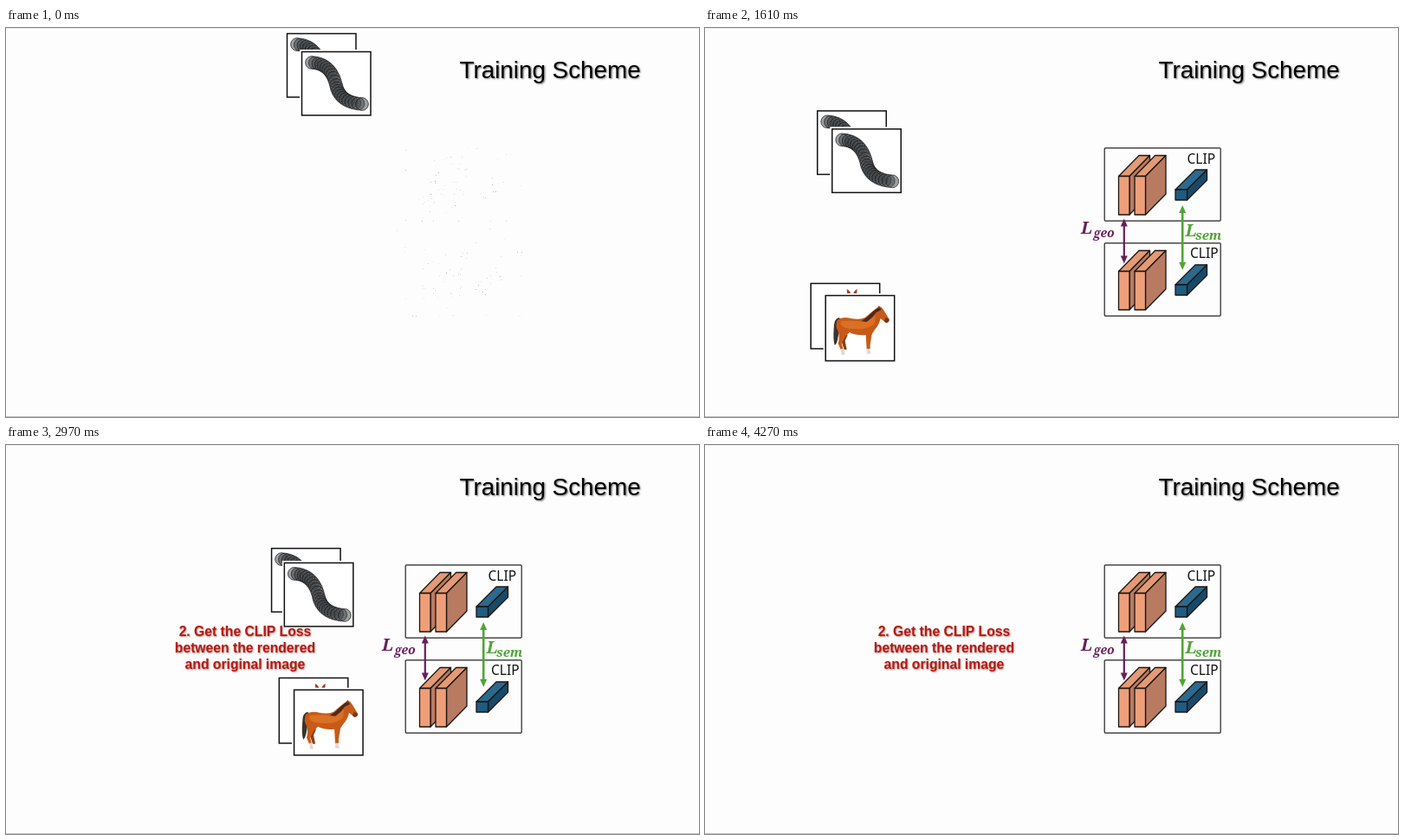
Animation, 800 px wide and 450 px high, one loop 4300 ms. Source, as an HTML page with a canvas:

```html
<!DOCTYPE html>
<html lang="en">
<head>
<meta charset="utf-8">
<title>Training Scheme</title>
<style>
html, body { margin: 0; width: 100%; height: 100%; overflow: hidden; background: #fdfdfd; }
canvas { display: block; }
</style>
</head>
<body>
<canvas id="stage" width="800" height="450"></canvas>
<script>
const W = 800, H = 450, LOOP = 4300;
const ctx = document.getElementById('stage').getContext('2d');
const clamp = v => Math.min(1, Math.max(0, v));
const span = (t, from, to) => clamp((t - from) / (to - from));
const ease = u => u * u * (3 - 2 * u);
const mix = (a, b, p) => a.map((v, i) => v + (b[i] - v) * p);

function poly(c, fill, points) {
  c.beginPath();
  points.forEach(([x, y]) => c.lineTo(x, y));
  c.closePath();
  c.fillStyle = fill;
  c.fill();
  c.stroke();
}

// A box seen from the upper right: front face plus top and side.
function prism(c, x, y, w, h, dx, dy, [front, top, side]) {
  const r = x + w, b = y + h;
  c.strokeStyle = '#1c1512';
  c.lineWidth = 1.3;
  c.lineJoin = 'round';
  poly(c, top, [[x, y], [x + dx, y - dy], [r + dx, y - dy], [r, y]]);
  poly(c, side, [[r, y], [r + dx, y - dy], [r + dx, b - dy], [r, b]]);
  poly(c, front, [[x, y], [r, y], [r, b], [x, b]]);
}

function label(c, text, x, y, font, color) {
  c.font = font;
  c.fillStyle = color;
  c.fillText(text, x, y);
}

function arrow(c, x, top, bottom, size, width, color) {
  c.fillStyle = color;
  c.fillRect(x - width / 2, top + size, width, bottom - top - 2 * size);
  for (const [y, d] of [[top, size + 1], [bottom, -size - 1]]) {
    c.beginPath();
    c.moveTo(x, y);
    c.lineTo(x - size / 2, y + d);
    c.lineTo(x + size / 2, y + d);
    c.fill();
  }
}

function encoder(c, dy, textX, textY) {
  const orange = ['#ee9f79', '#e39a75', '#b87b62'];
  c.strokeStyle = '#222';
  c.lineWidth = 1.2;
  c.beginPath();
  c.roundRect(461.2, 138.8 + dy, 134, 84.3, 1);
  c.stroke();
  prism(c, 477.5, 171.5 + dy, 12.5, 44.5, 23.5, 24, orange);
  prism(c, 496, 171.5 + dy, 12.5, 44.5, 23.5, 24, orange);
  prism(c, 543, 187 + dy, 13.5, 12, 23, 23, ['#1f5c80', '#2b698e', '#174a69']);
  label(c, 'CLIP', textX, textY, '500 15.5px "Noto Sans", sans-serif', '#111');
}

function drawDiagram(c) {
  const math = size => `italic bold ${size}px "Noto Serif", serif`;
  const purple = '#671e5b', green = '#4ea536';
  encoder(c, 0, 556.5, 156.5);
  encoder(c, 110, 560, 266);
  arrow(c, 483.8, 220.5, 272.5, 8, 2.2, purple);
  arrow(c, 551.2, 205, 280, 8, 2.6, green);
  label(c, 'L', 434, 237.5, math(20), purple);
  label(c, 'geo', 448.5, 241.5, math(14), purple);
  label(c, 'L', 554.5, 240.5, math(20), green);
  label(c, 'sem', 566, 244.5, math(15), green);
}

const layer = new OffscreenCanvas(W, H).getContext('2d', { willReadFrequently: true });
drawDiagram(layer);
const pixels = layer.getImageData(0, 0, W, H);
const solid = layer.canvas;
const speckled = new OffscreenCanvas(W, H).getContext('2d');
let seed = 7;
const noise = Float32Array.from({ length: W * H }, () =>
  (seed = (Math.imul(seed, 1664525) + 1013904223) >>> 0) / 4294967296);

// Each pixel fades in softly once p passes its own threshold.
function diagram(p) {
  if (p >= 1.05) return ctx.drawImage(solid, 0, 0);
  const part = new ImageData(new Uint8ClampedArray(pixels.data), W);
  noise.forEach((n, i) => { part.data[4 * i + 3] *= clamp((p - n) * 25); });
  speckled.putImageData(part, 0, 0);
  ctx.drawImage(speckled.canvas, 0, 0);
}

function card([x, y], h, picture) {
  ctx.save();
  ctx.translate(x, y);
  ctx.fillStyle = '#fff';
  ctx.fillRect(-2, -2, 84, h + 4);
  picture();
  ctx.strokeStyle = '#111';
  ctx.lineWidth = 1.5;
  ctx.strokeRect(0.5, 0.5, 79.5, h);
  ctx.restore();
}

const quad = (t, a, b, c) => (1 - t) * (1 - t) * a + 2 * t * (1 - t) * b + t * t * c;

function worm() {
  ctx.fillStyle = 'rgba(62,66,68,.5)';
  ctx.strokeStyle = 'rgba(14,16,18,.85)';
  ctx.lineWidth = 0.8;
  for (let i = 0; i <= 22; i++) {
    const t = i / 11;
    const [x, y] = t < 1 ? [quad(t, 12, 34, 40), quad(t, 13, 14, 39)]
      : [quad(t - 1, 40, 44, 70), quad(t - 1, 39, 59, 61)];
    ctx.beginPath();
    ctx.arc(x, y, 7.4, 0, 7);
    ctx.fill();
    ctx.stroke();
  }
}

const shape = (color, d) => { ctx.fillStyle = color; ctx.fill(new Path2D(d)); };

function horse() {
  shape('#3b332f', 'M16 26Q10 27 10 39Q9 51 11 58Q14 56 15 48Q17 38 18 28Z');
  shape('#8f3e14', 'M19 42L26 46L23 53L25 63H22L19 54ZM49 43L54 44L51 54L52 62H49Z');
  shape('#c75a18', 'M14 29Q20 24 30 27Q40 29 46 26Q53 20 58 16L62 13L65 14L68 18L74 28Q74 32 70 32L64 27Q62 35 58 39L54 45L51 63H48L47 46Q36 47 28 43L23 48L19 56L21 63H18L15 56Q17 49 15 42Q11 36 14 29Z');
  shape('#da7023', 'M18 30Q32 29 45 31Q52 29 58 23L57 33Q49 40 36 39Q22 40 18 34Z');
  shape('#4a2a1e', 'M62 14L65 17L59 20Q55 26 48 31L42 30Q49 26 55 19Z');
  shape('#8b3f26', 'M61 15L62 12L65 16Z');
  shape('#6e3a24', 'M70 26L74 28Q74 32 70 32L68 30Z');
  shape('#e6d6cf', 'M18 62H21L23 69H19ZM48 62H51L53 68H48Z');
}

function ears() {
  shape('#9c4226', 'M42 7Q48 10 47 18H43ZM54 7Q48 10 49 18H53Z');
  shape('#c57f66', 'M44 11L46 15H44ZM52 11L50 15H52Z');
}

// Card order: worm back, worm front, horse back, horse front.
const entry = [[324, 6], [341, 27], [-129, 297.5], [-112, 311.5]];
const rest = [[129, 95.5], [146, 116.5], [122, 295], [139, 309]];
const ready = [[125, 97.5], [141, 119.2], [133, 294.3], [150, 308.3]];
const merged = [[464.6, 138], [478.3, 150.5], [474, 246.8], [491.5, 260.5]];
const pictures = [worm, worm, ears, horse];

function cards(t) {
  const shift = ease(span(t, 1780, 2080));
  const enter = ease(span(t, 225, 1640));
  const leave = ease(span(t, 2228, 3651));
  ctx.globalAlpha = 1 - span(t, 3850, 4150);
  pictures.forEach((picture, i) => {
    const pos = t < 1780 ? mix(entry[i], rest[i], enter)
      : t < 2228 ? mix(rest[i], ready[i], shift)
      : mix(ready[i], merged[i], leave);
    card(pos, i < 2 ? 73.5 : 75.5, picture);
  });
  ctx.globalAlpha = 1;
}

function shadow(color, blur, offset) {
  ctx.shadowColor = color;
  ctx.shadowBlur = blur;
  ctx.shadowOffsetX = ctx.shadowOffsetY = offset;
}

function texts(t) {
  ctx.save();
  shadow('rgba(0,0,0,.5)', 2, 1.2);
  label(ctx, 'Training Scheme', 523.5, 58, '27.8px "Liberation Sans", Arial, sans-serif', '#000');
  shadow('rgba(90,30,20,.5)', 2, 0.8);
  ctx.globalAlpha = span(t, 1780, 2080);
  ctx.textAlign = 'center';
  ['2. Get the CLIP Loss', 'between the rendered', 'and original image'].forEach((line, i) =>
    label(ctx, line, 275.9, 221 + 19 * i, 'bold 15.7px "Liberation Sans", Arial, sans-serif', '#b81810'));
  ctx.restore();
}

function draw(now) {
  const t = now % LOOP;
  ctx.fillStyle = '#fdfdfd';
  ctx.fillRect(0, 0, W, H);
  ctx.fillStyle = '#ececec';
  ctx.fillRect(0, 0, W, 1);
  ctx.fillStyle = '#c4c4c4';
  ctx.fillRect(0, H - 1, W, 1);
  cards(t);
  diagram(0.014 + t / 500);
  texts(t);
  requestAnimationFrame(draw);
}
requestAnimationFrame(draw);
</script>
</body>
</html>
```
